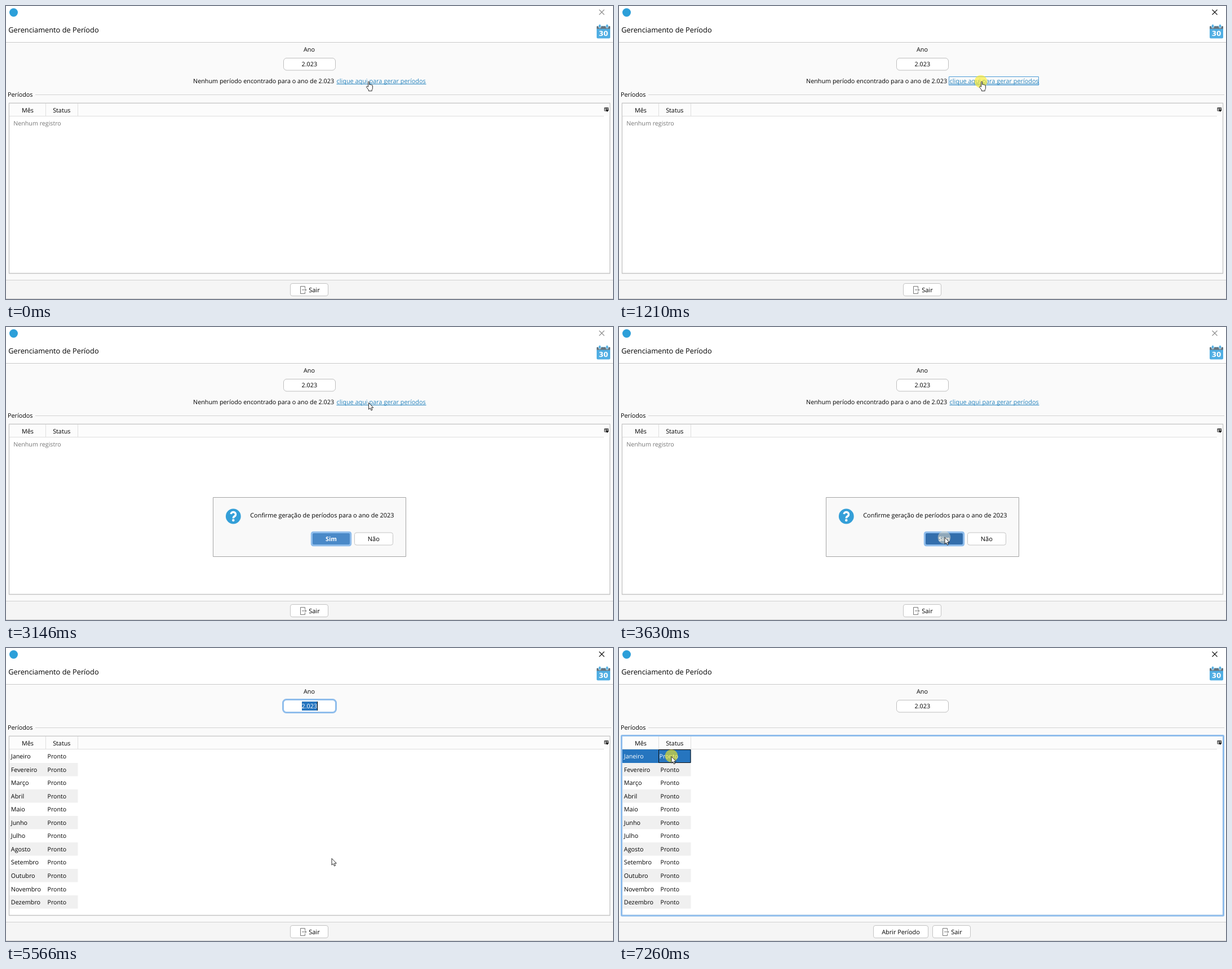
An HTML page with a canvas that plays this animation: 1077x520 px, repeating every 8000 ms.

```html
<!DOCTYPE html>
<html lang="pt-BR">
<head>
<meta charset="utf-8">
<title>Gerenciamento de Período</title>
<style>
html, body { margin: 0; width: 100%; height: 100%; overflow: hidden; background: #fff; }
canvas { display: block; }
</style>
</head>
<body>
<canvas id="stage" width="1077" height="520"></canvas>
<script>
const ctx = document.getElementById('stage').getContext('2d');
const FONT = '"Open Sans", "Noto Sans", sans-serif';
const MONTHS = ['Janeiro', 'Fevereiro', 'Março', 'Abril', 'Maio', 'Junho', 'Julho',
  'Agosto', 'Setembro', 'Outubro', 'Novembro', 'Dezembro'];
const LOOP = 8000, STEP = 1210, ROW = 23.56;
const BLUE = '#2675bf', RING = '#8fbdec', INK = '#000';

function text(str, x, y, { size = 10.8, color = INK, align = 'left', weight = 400, font = FONT } = {}) {
  ctx.font = `${weight} ${size}px ${font}`;
  ctx.textRendering = 'geometricPrecision';
  ctx.textAlign = align;
  ctx.fillStyle = color;
  ctx.fillText(str, x, y);
}

function rect(x, y, w, h, color) {
  ctx.fillStyle = color;
  ctx.fillRect(x, y, w, h);
}

function box(x, y, w, h, r, fill, stroke, line = 1) {
  ctx.beginPath();
  ctx.roundRect(x, y, w, h, r);
  if (fill) { ctx.fillStyle = fill; ctx.fill(); }
  if (stroke) { ctx.strokeStyle = stroke; ctx.lineWidth = line; ctx.stroke(); }
}

function disc(x, y, r, color) {
  ctx.beginPath();
  ctx.arc(x, y, r, 0, Math.PI * 2);
  ctx.fillStyle = color;
  ctx.fill();
}

function lines(color, width, ...paths) {
  ctx.strokeStyle = color;
  ctx.lineWidth = width;
  ctx.beginPath();
  for (const p of paths) {
    ctx.moveTo(p[0], p[1]);
    for (let i = 2; i < p.length; i += 2) ctx.lineTo(p[i], p[i + 1]);
  }
  ctx.stroke();
}

function shape(d, x, y) {
  ctx.save();
  ctx.translate(x, y);
  const p = new Path2D(d);
  ctx.fillStyle = '#fff';
  ctx.fill(p);
  ctx.strokeStyle = '#111';
  ctx.lineWidth = 0.9;
  ctx.lineJoin = 'round';
  ctx.stroke(p);
  ctx.restore();
}

const arrow = (x, y) =>
  shape('M.5 .5V12.2L3.1 9.8L5 14L7 13.1L5.2 9.1H8.8Z', x, y);

const hand = (x, y) =>
  shape('M3.6 10V1.6Q3.6 .5 4.6 .5T5.6 1.6V6Q6.5 5.2 7.5 6.3Q8.7 5.6 9.5 6.8Q11.5 6.4 11.5 8.3V12Q11.5 14 10.2 15.3V17.3H4.4V15.5L.8 10.8Q.2 9.4 1.3 8.9Q2.3 8.7 3.6 10Z', x, y);

function calendar() {
  box(1048, 35.5, 24, 22, 2, '#50aee3');
  rect(1048, 36, 24, 4.5, '#66757f');
  for (const x of [1051.5, 1064.5]) box(x, 32.5, 4, 6.5, 2, '#50aee3', '#fff', 0.7);
  text('30', 1060, 53, {
    size: 12, weight: 700, color: '#fff', align: 'center', font: '"DejaVu Sans", sans-serif'
  });
}

function header(active) {
  rect(0, 0, 1077, 520, '#fff');
  rect(0, 65, 1077, 454, '#fafafa');
  rect(0, 64, 1077, 1, '#c9c9c9');
  disc(13.5, 11.5, 7.5, '#2c9fd9');
  lines(active ? '#111' : '#8c8c8c', 1.1, [1052.5, 6.5, 1061.5, 15.5], [1061.5, 6.5, 1052.5, 15.5]);
  text('Gerenciamento de Período', 4.2, 47, { size: 12.8 });
  calendar();
}

function yearField(focused) {
  text('Ano', 538, 81, { align: 'center' });
  if (focused) box(491.5, 91.5, 94, 23, 6, '#fff', RING, 3);
  else box(492.5, 92.5, 92, 21.5, 5.5, '#fff', '#bebebe');
  if (focused) {
    rect(525, 95, 27, 16, BLUE);
    rect(552, 95, 1, 16, '#000');
  }
  text('2.023', 538.3, 107, { align: 'center', color: focused ? '#fff' : INK });
}

function notice(focused) {
  const color = '#2382bd';
  text('Nenhum período encontrado para o ano de 2.023', 332, 137);
  text('clique aqui para gerar períodos', 586.6, 137, { size: 10.86, color });
  rect(586.5, 138, 159, 1, color);
  if (focused) box(585.5, 125.5, 159, 15, 0, null, '#4b9ad6');
}

function table(y, focused) {
  const grid = '#dedede';
  text('Períodos', 3, y - 11);
  rect(52, y - 15, 1022, 1, '#d2d2d2');
  box(5.5, y + 0.5, 1066, 474 - y, 0, '#fff', '#c4c4c4', 1.3);
  rect(6, y + 1, 1065, 22, '#fcfcfc');
  rect(6, y + 23, 1055, 1, grid);
  rect(70, y + 1, 1, 22, grid);
  rect(127, y + 1, 1, 22, grid);
  text('Mês', 38.5, y + 16.5, { align: 'center' });
  text('Status', 98.8, y + 16.5, { align: 'center' });
  // column chooser
  box(1062, y + 8.5, 6.5, 5.5, 0, '#fff', '#222');
  lines('#222', 1, [1062, y + 10.5, 1068.5, y + 10.5], [1065.3, y + 8.5, 1065.3, y + 14]);
  ctx.beginPath();
  ctx.moveTo(1063.8, y + 12);
  ctx.lineTo(1069.6, y + 12);
  ctx.lineTo(1066.7, y + 16);
  ctx.fillStyle = '#111';
  ctx.fill();
  if (focused) box(4.5, y - 0.5, 1068, 475.5 - y, 1, null, RING, 3);
}

function months(selected) {
  MONTHS.forEach((name, i) => {
    const top = Math.round(180 + i * ROW), base = top + 16;
    const on = selected && i === 0, color = on ? '#fff' : INK;
    if (on) {
      rect(6, top, 121.5, 24, BLUE);
      box(70.5, top + 0.5, 56.5, 23, 0, null, '#111');
    } else if (i % 2) {
      rect(6, top, 121.5, 23.5, '#f0f0f0');
    }
    text(name, 8.8, base, { color });
    text('Pronto', on ? 71.5 : 73.5, base, { size: 10.6, color });
  });
}

function button(x, y, w, h) {
  box(x + 0.5, y + 0.5, w - 1, h - 1, 3.5, '#fff', '#c4c4c4');
}

function exitButton(x) {
  button(x, 492, 68, 23);
  lines('#777', 1, [x + 26.5, 501, x + 26.5, 497.5, x + 18.5, 497.5, x + 18.5, 510.5, x + 26.5, 510.5, x + 26.5, 507],
    [x + 21, 503.8, x + 29, 503.8], [x + 26.5, 501.5, x + 29, 503.8, x + 26.5, 506]);
  text('Sair', x + 33.2, 508, { size: 11 });
}

function footer(canOpen) {
  rect(0, 486, 1077, 33, '#f5f5f5');
  rect(0, 486, 1077, 1, '#d0d0d0');
  rect(0, 519, 1077, 1, '#d0d0d0');
  if (canOpen) {
    button(451, 492, 98, 23);
    text('Abrir Período', 500, 508, { size: 10.9, align: 'center' });
  }
  exitButton(canOpen ? 556 : 504);
}

function questionIcon(x, y) {
  disc(x, y, 13.4, '#349fd8');
  ctx.beginPath();
  ctx.arc(x, y - 3.4, 4.2, Math.PI * 1.05, Math.PI * 2.2);
  ctx.quadraticCurveTo(x, y + 0.8, x, y + 3.4);
  ctx.strokeStyle = '#fff';
  ctx.lineWidth = 3.5;
  ctx.stroke();
  disc(x, y + 7, 2.2, '#fff');
}

function dialog(pressed) {
  box(367.5, 302.5, 342, 105, 0, '#f9f9f9', '#a3a3a3');
  questionIcon(403.3, 336);
  text('Confirme geração de períodos para o ano de 2023', 433.2, 338.3, { size: 10.93 });
  box(540.8, 362.8, 72.4, 26.4, 4.5, RING);
  box(544, 366, 66, 20, 2, pressed ? '#336eac' : '#4a89c8');
  text('Sim', 577, 380, { size: 10.9, weight: 700, color: '#fff', align: 'center' });
  button(618, 364.5, 69, 23);
  text('Não', 652.3, 380, { size: 11, align: 'center' });
}

const GLOW = 'rgba(250, 235, 30, .6)';

const scenes = [
  { empty: true, pointer: [639, 133.5], hand: true },
  { empty: true, active: true, linkFocus: true, glow: [642, 134, GLOW], pointer: [639, 133.5], hand: true },
  { empty: true, ask: true, pointer: [643, 134] },
  { empty: true, ask: true, pressed: true, glow: [577, 373.5, 'rgba(235, 225, 200, .5)'], pointer: [577.5, 373] },
  { active: true, yearFocus: true, pointer: [577.5, 373] },
  { active: true, yearFocus: true, pointer: [102, 186.5] },
  { active: true, selected: true, glow: [93, 191.5, GLOW], pointer: [92.5, 192] }
];

function draw(s) {
  header(s.active);
  yearField(s.yearFocus);
  if (s.empty) notice(s.linkFocus);
  table(s.empty ? 172 : 156, s.selected);
  if (s.empty) text('Nenhum registro', 13.2, 211.5, { size: 10.7, color: '#777' });
  else months(s.selected);
  footer(s.selected);
  if (s.ask) dialog(s.pressed);
  if (s.glow) disc(s.glow[0], s.glow[1], 11.3, s.glow[2]);
  (s.hand ? hand : arrow)(...s.pointer);
}

const start = performance.now();
function tick() {
  const t = (performance.now() - start) % LOOP;
  draw(scenes[Math.min(Math.floor(t / STEP), scenes.length - 1)]);
  requestAnimationFrame(tick);
}
tick();
</script>
</body>
</html>
```
